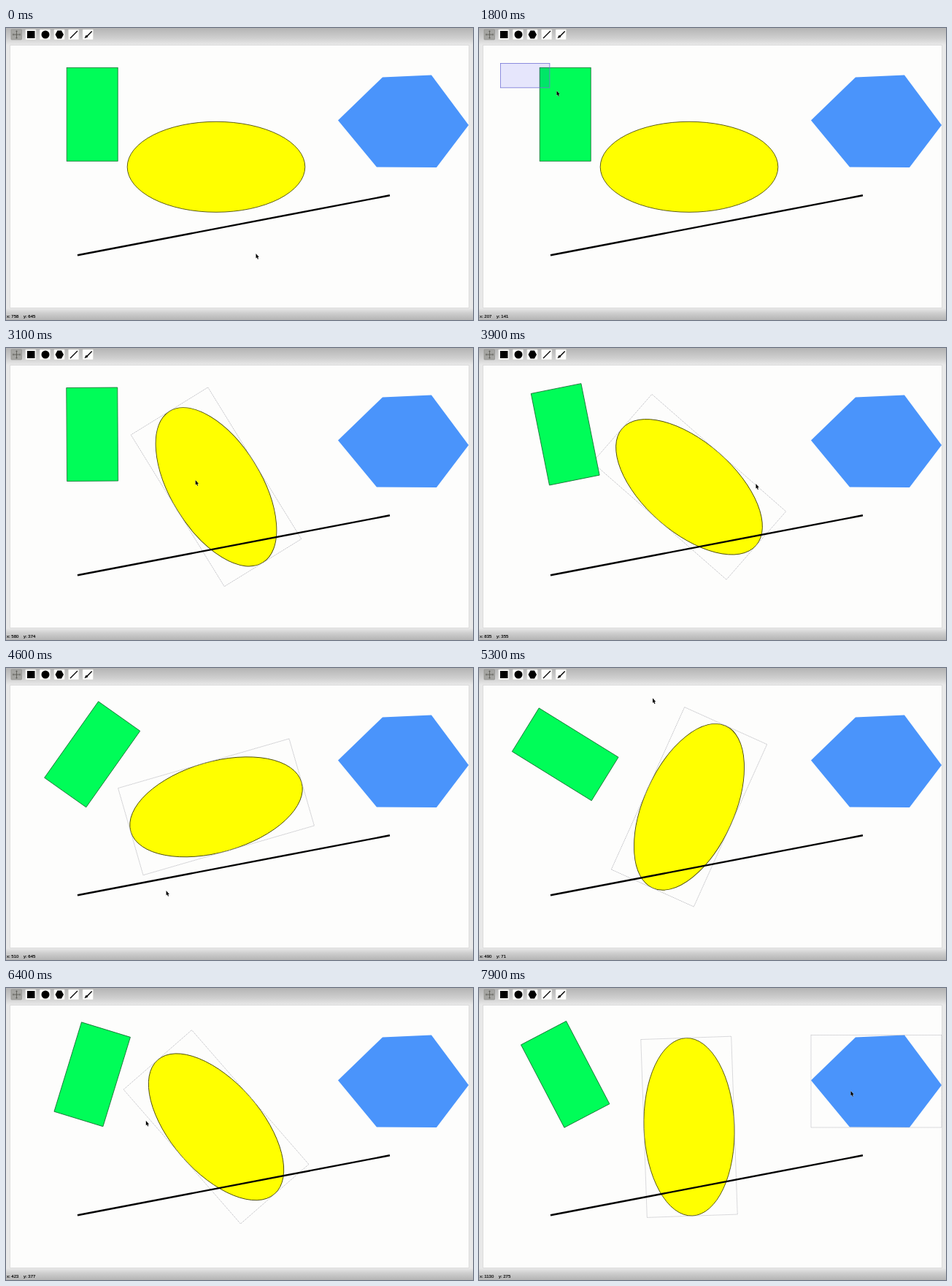
Animation of 640 by 400 pixels, one loop 8 s. Source, as an HTML page:

```html
<!DOCTYPE html>
<html lang="en">
<head>
<meta charset="utf-8">
<title>Shape editor</title>
<style>
  html, body { margin: 0; width: 100%; height: 100%; overflow: hidden; }
  svg { display: block; width: 640px; height: 400px; }
  text { font: 6px "Liberation Sans", Arial, sans-serif; white-space: pre; stroke: #000; stroke-width: .15; }
  .box { fill: none; stroke: #b4b4ba; stroke-width: .8; stroke-dasharray: 1.2 .8; }
</style>
</head>
<body>
<svg viewBox="0 0 640 400">
  <defs>
    <linearGradient id="bar" x2="0" y2="1">
      <stop offset="0" stop-color="#b4b4b4"/>
      <stop offset=".6" stop-color="#cfcfcf"/>
      <stop offset="1" stop-color="#e8e8e8"/>
    </linearGradient>
  </defs>

  <rect width="640" height="400" fill="#e8e8e8"/>
  <rect width="640" height="23" fill="url(#bar)"/>
  <rect width="640" height="16" fill="url(#bar)" transform="matrix(1 0 0 -1 0 400)"/>
  <rect x="5.5" y="23.5" width="629" height="360" fill="#fdfdfc" stroke="#dcdcdc"/>

  <g id="tools"></g>
  <g stroke="#55554f" stroke-width=".8" fill="none">
    <path d="M9 9H20M14.5 3.5V14.5"/>
    <path d="M13 4.5h3M13 13.5h3M10 7.5v3M19 7.5v3" stroke-width=".5"/>
  </g>
  <path d="M29 4h10.500v10h-10.500zM67.500 9l3-5.500h5.500l3 5.500-3 5.500h-5.500z"/>
  <circle cx="54" cy="9" r="5.500"/>
  <path d="M88 14L98 4" stroke="#000" stroke-width="1.200"/>
  <path d="M107.500 14l2-4 1.500.2 6.200-6.200 1 .9-6.200 6.300-.2 1.600z"/>

  <g id="ellipse">
    <ellipse rx="121.800" ry="62" fill="#ff0" stroke="#4c4c08" stroke-width=".9"/>
    <rect id="ellipseBox" class="box" x="-122" y="-62" width="244" height="124"/>
  </g>
  <path d="M455 126.500L516 67.500 583 64.500 634 133 590 191 508 190.500z" fill="#4a94fb"/>
  <rect id="polyBox" class="box" x="455" y="64.500" width="179" height="126.500"/>
  <g id="green">
    <rect x="-35" y="-64" width="70" height="128" fill="#00fd58" stroke="#126b30" stroke-width=".8"/>
  </g>
  <path d="M98 311.200L526 229.300" stroke="#000" stroke-width="2.400"/>
  <rect id="band" x="29.500" y="48.500" fill="#00f" fill-opacity=".09" stroke="#7373d6" stroke-width=".8"/>
  <text id="status" x="1" y="396.500"></text>
  <path id="cursor" d="M0 0V6.500L1.400 5.300 2.400 7.800 3.500 7.300 2.500 5H4.300z" stroke="#fff" stroke-width=".5" paint-order="stroke"/>
</svg>
<script>
const LOOP = 8000, STEP = 100;
const GRAB = 2900, RELEASE = 7000, LEAVE = 7350;
const hub = [288, 190.3], pivot = [118.2, 118.3];
const $ = id => document.getElementById(id);

// Circling drag around the ellipse: time, angle, radius
const orbit = [
  [GRAB, 134, 7.6], [3100, 196.5, 29], [3900, 358, 92],
  [5300, 611.5, 156], [6400, 904.5, 96], [RELEASE, 942, 113]
];

function polar([, angle, r]) {
  const a = angle * Math.PI / 180;
  return [hub[0] + r * Math.cos(a), hub[1] + r * Math.sin(a)];
}

const pick = polar(orbit[0]), drop = polar(orbit[orbit.length - 1]);

// Plain pointer moves: time, x, y
const moves = [
  [300, 343, 310], [1250, 29.5, 48.5], [1550, 29.5, 48.5], [1800, 107, 87],
  [2400, 428, 262], [2850, ...pick], [LEAVE, ...drop], [7700, 513, 138], [7900, 510, 142]
];

const slope = (a, b, k) => (b[k] - a[k]) / (b[0] - a[0]);

// Harmonic tangents keep holds flat and avoid overshoot.
function tangent(rows, i, k) {
  if (i === 0 || i === rows.length - 1) return 0;
  const a = slope(rows[i - 1], rows[i], k), b = slope(rows[i], rows[i + 1], k);
  return a * b > 0 ? 2 * a * b / (a + b) : 0;
}

function sample(rows, time) {
  const t = Math.min(Math.max(time, rows[0][0]), rows[rows.length - 1][0]);
  let i = 0;
  while (i < rows.length - 2 && t >= rows[i + 1][0]) i++;
  const a = rows[i], b = rows[i + 1], d = b[0] - a[0], u = (t - a[0]) / d;
  return [t, ...[1, 2].map(k => {
    const m = tangent(rows, i, k) * d, n = tangent(rows, i + 1, k) * d, h = b[k] - a[k];
    return a[k] + u * (m + u * (3 * h - 2 * m - n + u * (m + n - 2 * h)));
  })];
}

const drag = t => polar(sample(orbit, t));
const pointer = t => t >= GRAB && t < LEAVE ? drag(t) : sample(moves, t).slice(1);
const bearing = ([cx, cy], [x, y]) => Math.atan2(y - cy, x - cx) * 180 / Math.PI;
const turn = (centre, p) => bearing(centre, p) - bearing(centre, pick);

const show = (id, on) => $(id).setAttribute("visibility", on ? "visible" : "hidden");
const place = (id, [x, y], angle = 0) =>
  $(id).setAttribute("transform", `translate(${x} ${y}) rotate(${angle})`);

function draw(t) {
  const [x, y] = pointer(t);
  place("cursor", [x - .5, y - 1]);

  // Shapes, band and readout trail the pointer slightly.
  const held = drag(t - 15);
  place("ellipse", hub, turn(hub, held));
  place("green", pivot, turn(pivot, held));

  const [bx, by] = pointer(t - 25);
  $("band").setAttribute("width", Math.max(0, bx - 29.5));
  $("band").setAttribute("height", Math.max(0, by - 48.5));
  show("band", t >= 1600 && t < 2500);
  show("ellipseBox", t >= 2500);
  show("polyBox", t >= 7700);

  const [sx, sy] = pointer(t - 30);
  $("status").textContent = `x: ${Math.round(2.22 * sx - 3)}    y: ${Math.max(0, Math.round(2.2 * sy - 37))}`;
}

for (let i = 0; i < 6; i++) {
  const r = document.createElementNS("http://www.w3.org/2000/svg", "rect");
  const look = { x: 7 + 19.6 * i, y: 2, width: 14.5, height: 14, rx: .8,
    fill: i ? "#fdfdfc" : "#a5a5a2", stroke: i ? "#d8d8d4" : "#8a8a86", "stroke-width": .6 };
  for (const k in look) r.setAttribute(k, look[k]);
  $("tools").append(r);
}

const start = performance.now();
function tick() {
  const t = (performance.now() - start) % LOOP;
  draw(Math.floor(t / STEP) * STEP);
  requestAnimationFrame(tick);
}
tick();
</script>
</body>
</html>
```
